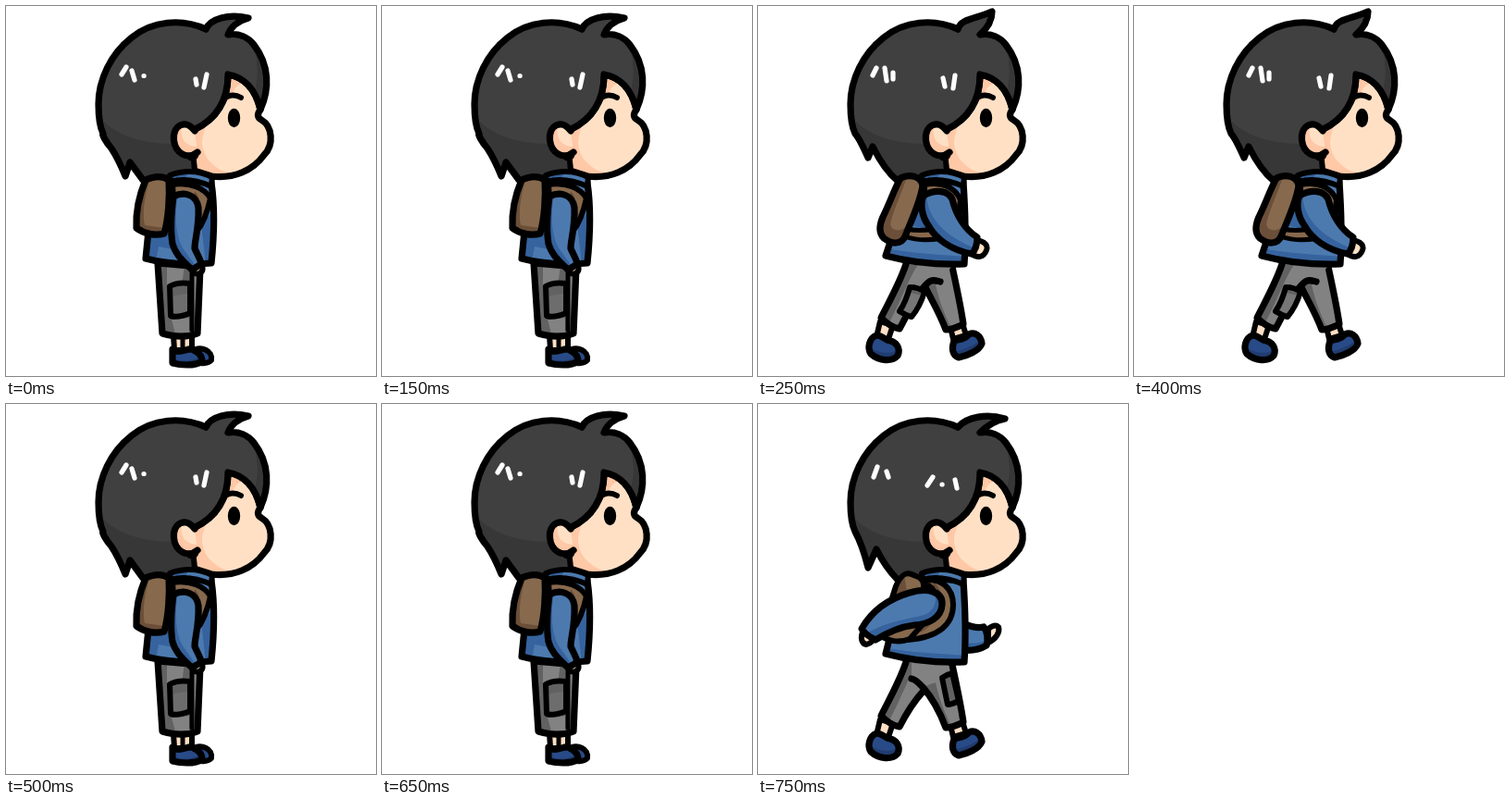
Animation of 400 by 400 pixels, one loop 1 s. Source, as an HTML page with a canvas:

```html
<!DOCTYPE html>
<html lang="en">
<head>
<meta charset="utf-8">
<title>Walking boy</title>
<style>
html, body { margin: 0; width: 100%; height: 100%; overflow: hidden; background: #fff; }
canvas { display: block; width: 400px; height: 400px; }
</style>
</head>
<body>
<canvas id="stage" width="400" height="400"></canvas>
<script>
const ctx = document.getElementById('stage').getContext('2d');
const INK = '#000';
const HAIR = '#404040', HAIR_DARK = '#373737';
const SKIN = '#ffe0c5', SKIN_DARK = '#ffc8a6';
const BLUE = '#4c7aaf', BLUE_DARK = '#36639e';
const BROWN = '#87694d', BROWN_DARK = '#6b4f39';
const GREY = '#828282', GREY_DARK = '#626262';
const SHOE = '#284b88', SHOE_DARK = '#213c70';
const BOLD = 7.2, FINE = 6;

function line(d, width = BOLD, color = INK) {
  ctx.lineWidth = width;
  ctx.strokeStyle = color;
  ctx.stroke(new Path2D(d));
}

// Filled outline with an optional shadow clipped to the inside.
function part(d, fill, width = BOLD, dark, shadow) {
  const p = new Path2D(d);
  ctx.fillStyle = fill;
  ctx.fill(p);
  if (shadow) {
    ctx.save();
    ctx.clip(p);
    ctx.fillStyle = dark;
    ctx.fill(new Path2D(shadow));
    ctx.restore();
  }
  if (width) line(d, width);
}

const styles = {
  stand: {
    tuft: 'C221,14 240,8 262,13 C251,16 243,23 240,31',
    nape: 'C103,138 108,147 114,154 C120,163 125,174 129,184 L134,169 L148,188',
    shine: 'M130,66 L125,74 M136,70 L139,80 M149,75.5 h.1 M205,79 L206,85 M217,74 L214,88'
  },
  stepA: {
    tuft: 'C220,13 236,14 253,6 C253,16 248,24 240,31',
    nape: 'C109,142 114,153 119,164 L124,152 C132,168 141,181 151,189',
    shine: 'M128,67 L124,75 M137,67 L139,81 M146,72 L146,79 M200,78 L202,87 M213,75 L211,89'
  },
  stepB: {
    tuft: 'C226,14 247,10 267,16 C256,18 247,24 240,31',
    nape: 'C110,147 115,161 119,177 L128,157 C134,169 142,181 151,190',
    shine: 'M129,68 L125,79 M139,73 L141,79 M189,79 L183,88 M199,87 h.1 M213,82 L215,91'
  }
};

function head({ tuft, nape, shine }) {
  const back = 'M216,25 C190,13 158,16 136,34 C113,52 100,80 100,106 C100,120 101,130 105,138' + nape;
  const crest = 'C252,29 262,34 268,42 C285,64 285,90 275,112';
  const fringe = 'C270,91 258,77 240,74 C240,108 222,125 203,134';

  part('M275,112 C271,117 272,121 276,123 C288,130 290,150 279,161 C267,178 246,187 222,184' +
    ' L203,178 L200,135 L203,134 C222,125 240,108 240,74 C258,77 270,91 275,112 Z',
    SKIN, BOLD, SKIN_DARK,
    'M190,130 L240,70 L258,82 C246,86 246,94 242,101 C228,112 214,127 212,146' +
    ' C212,162 222,175 244,182 L200,190 Z');
  part(back + ' L176,186 L204,180 L201,162 L203,134 C222,125 240,108 240,74 L240,31 Z',
    HAIR, 0, HAIR_DARK,
    'M95,113 C112,137 141,150 187,149 L206,164 L204,190 L95,195 Z');
  const top = 'M216,25' + tuft + crest + fringe;
  part(top, HAIR, 0, HAIR_DARK, 'M264,36 C275,60 273,84 266,98 L275,114 L292,80 Z');
  line(back);
  line(top);
  line(shine, 5.2, '#fff');

  part('M204,135 C195,122 180,128 181.5,145 C183,159 196,167 207,158', SKIN, BOLD, SKIN_DARK,
    'M180,130 L191,126 C187,139 191,152 207,152 L208,168 L178,160 Z');
  line('M206,159 C205,164 202,166 199,164 M203,167 L204,179', FINE);
  line('M235,102 C238,96 247,95 254,99', FINE);
  ctx.fillStyle = INK;
  ctx.beginPath();
  ctx.ellipse(246.5, 121, 6.7, 10.2, 0, 0, Math.PI * 2);
  ctx.fill();
}

function collar() {
  part('M177,183 C191,178 207,177 223,185 L222,195 C208,189 192,186 178,190 Z',
    BLUE, FINE, BLUE_DARK, 'M176,180 L196,178 L194,196 L176,195 Z');
}

function standLegs() {
  part('M181,356 L182,372 H201 V356 Z', SKIN, FINE);
  line('M191,358 V370', 5);
  part('M200,374 C211,366 224,373 222,383 C217,388 208,386 201,385 Z', SHOE, FINE);
  part('M180,371 C187,377 195,370 201,371 C207,374 212,377 212,384 C204,390 187,388 180,386 Z',
    SHOE, BOLD, SHOE_DARK, 'M178,380 C190,385 202,385 214,377 V392 H178 Z');
  part('M164,278 L169,354 C183,358 197,358 207,354 L210,282 Z', GREY_DARK, BOLD,
    GREY, 'M174,278 L193,280 L190,302 L174,302 Z M203,285 L212,285 L209,352 L203,352 Z' +
    ' M179,339 L198,337 V353 L183,354 Z');
  part('M177,303 C184,299 192,299 199,300 L199,332 C192,335 185,337 178,335 Z',
    '#6d6d6d', FINE, GREY_DARK, 'M178,303 H199 V310 L178,314 Z');
  line('M201,286 V350', 5);
}

function strideFeet() {
  part('M132,341 L128,358 L140,363 L146,345 Z', SKIN, FINE);
  part('M207,343 L211,360 L225,356 L220,340 Z', SKIN, FINE);
  part('M128,356 C120,359 118,370 122,376 C131,384 145,385 151,378 C155,369 148,363 143,362' +
    ' C138,362 135,356 128,356 Z', SHOE, BOLD, SHOE_DARK,
    'M117,366 C129,376 142,378 156,370 V390 H117 Z');
  part('M212,362 C209,370 210,378 217,380 C226,378 239,373 242,365 C241,356 234,352 228,355' +
    ' C223,361 218,360 212,362 Z', SHOE, BOLD, SHOE_DARK,
    'M206,374 C219,374 232,368 244,359 V386 H206 Z');
}

// The hip stays open, so each leg is filled first and then edged.
function backLeg(inner) {
  const edge = 'M160,279 C153,300 142,319 133,337 C139,343 146,348 153,349' + inner;
  part(edge + ' L209,282 Z', GREY, 0, GREY_DARK,
    'M155,278 L174,278 C163,294 156,316 141,344 L129,340 Z');
  line(edge);
}

function frontLeg(start) {
  const edge = start + ' C186,315 196,331 203,350 C210,350 216,347 222,344 C219,323 214,301 210,282';
  part(edge + ' L166,280 Z', GREY, 0, GREY_DARK,
    start + ' L192,301 C196,321 203,335 210,352 L200,353 Z');
  line(edge);
}

function strideA() {
  strideFeet();
  frontLeg('M180,302');
  backLeg('C162,333 172,309 184,299 C188,295 193,297 197,298');
  part('M164,304 C170,304 175,305 180,309 C177,319 172,329 166,336 C161,335 157,332 153,330' +
    ' C159,321 162,312 164,304 Z', '#777', FINE, GREY_DARK, 'M162,302 L182,306 L178,313 L160,309 Z');
}

function strideB() {
  strideFeet();
  backLeg('C160,335 169,321 179,310');
  frontLeg('M166,297 C171,298 174,302 178,306');
  part('M199,296 C202,294 206,292 210,291 L217,321 C213,323 209,325 205,325 Z', GREY_DARK, FINE);
}

function standBody() {
  standLegs();
  part('M178,188 L222,191 C226,218 225,249 222,278 C197,280 173,279 151,273 L154,243 Z',
    BLUE, BOLD, BLUE_DARK, 'M150,247 H180 L185,264 L165,260 L162,276 H150 Z' +
    ' M211,235 L226,220 V280 H216 Z');
  part('M180,193 C199,190 215,197 221,208 C218,222 213,235 206,244 L181,208 Z',
    BROWN, FINE, BROWN_DARK, 'M204,200 C211,208 212,222 209,240 L200,245 Z');
  part('M151,188 C160,184 169,183 176,188 C177,204 176,229 171,246 C161,249 149,246 141,240' +
    ' C140,220 145,202 151,188 Z', BROWN, BOLD, BROWN_DARK,
    'M148,187 L156,185 C150,204 147,224 150,237 L172,240 V252 H138 Z');
  part('M202,280 C200,287 203,291 209,289 C214,287 213,282 211,278 Z', SKIN, FINE);
  part('M181,206 C193,200 206,204 208,218 C209,239 204,252 204,262 C207,269 210,274 211,278' +
    ' C209,281 205,283 201,285 C193,277 183,269 180,257 C177,239 179,221 181,206 Z',
    BLUE, BOLD, BLUE_DARK, 'M178,202 H186 C182,228 183,249 192,263 L205,281 L197,288 L175,265 Z');
  collar();
}

function forwardBody() {
  strideA();
  part('M178,188 L222,191 C224,220 225,250 223,279 C193,280 164,277 138,270 L144,252 L177,202 Z',
    BLUE, BOLD, BLUE_DARK, 'M136,261 C164,268 193,268 224,271 V284 H134 Z M160,235 L180,215 L186,243 Z');
  part('M180,193 C200,189 214,197 219,210 L216,232 L180,206 Z', BROWN, FINE,
    BROWN_DARK, 'M178,199 C198,196 210,206 211,228 L178,212 Z');
  part('M160,241 C170,243 180,243 189,241 L198,251 C184,254 170,253 158,249 Z', BROWN, 5);
  part('M154,186 C164,181 176,184 178,194 C176,211 166,231 159,249 C155,258 145,258 136,251' +
    ' C130,245 132,235 135,228 C142,214 147,199 154,186 Z', BROWN, BOLD, BROWN_DARK,
    'M150,184 L162,181 C157,199 146,221 143,236 C145,244 153,244 160,239 L156,262 L128,254 Z');
  part('M233,255 C241,251 250,258 247,264 C244,272 237,273 231,268 Z', SKIN, FINE);
  part('M179,205 C193,197 206,200 210,209 C214,226 224,242 237,250 C237,257 235,264 231,268' +
    ' C209,264 192,252 184,237 C177,227 175,214 179,205 Z', BLUE, BOLD, BLUE_DARK,
    'M174,202 L182,203 C183,227 198,247 235,262 L231,273 L190,252 Z');
  collar();
}

function backwardBody() {
  strideB();
  part('M249,243 C253,240 257,238 260,241 C262,247 257,254 249,258 Z', SKIN, FINE);
  part('M219,236 C228,240 236,243 244,241 C248,246 249,255 247,261 C239,266 230,267 220,266 Z',
    BLUE, BOLD, BLUE_DARK, 'M218,256 C230,261 241,258 252,254 V270 H218 Z');
  part('M178,188 L222,191 C224,220 225,250 223,279 C193,280 164,277 138,270 L143,250 L177,202 Z',
    BLUE, BOLD, BLUE_DARK, 'M136,263 C164,269 193,269 224,272 V284 H134 Z');
  part('M178,191 C199,187 211,200 211,217 C211,237 197,252 162,255 L166,236 L199,220 L188,199 Z',
    BROWN, FINE, BROWN_DARK,
    'M190,192 C204,206 204,230 176,247 L166,236 L199,220 L188,199 Z');
  part('M149,197 C154,186 159,181 166,184 C172,187 178,187 179,195 L180,236 L164,254' +
    ' C152,259 140,256 132,250 Z', BROWN, FINE, BROWN_DARK,
    'M148,190 L158,184 L161,204 L146,246 L130,258 Z');
  part('M114,244 C110,253 112,259 117,260 C122,259 125,256 126,250 Z', SKIN, FINE);
  part('M112,243 C124,222 143,210 164,204 C184,198 200,203 199,217 C198,231 185,238 169,239' +
    ' C153,241 140,247 127,255 C121,252 115,248 112,243 Z', BLUE, BOLD, BLUE_DARK,
    'M113,251 C130,238 157,233 180,228 C190,224 194,214 191,204 L204,208 V242 L169,246 L126,260 Z');
  collar();
}

const walk = [
  [styles.stand, standBody],
  [styles.stepA, forwardBody],
  [styles.stand, standBody],
  [styles.stepB, backwardBody]
];
const STEP = 250;

function draw(ms) {
  const [style, body] = walk[Math.floor(ms / STEP) % walk.length];
  ctx.fillStyle = '#fff';
  ctx.fillRect(0, 0, 400, 400);
  ctx.lineCap = ctx.lineJoin = 'round';
  head(style);
  body();
}

const start = performance.now();
function tick() {
  draw(performance.now() - start);
  requestAnimationFrame(tick);
}
tick();
</script>
</body>
</html>
```
